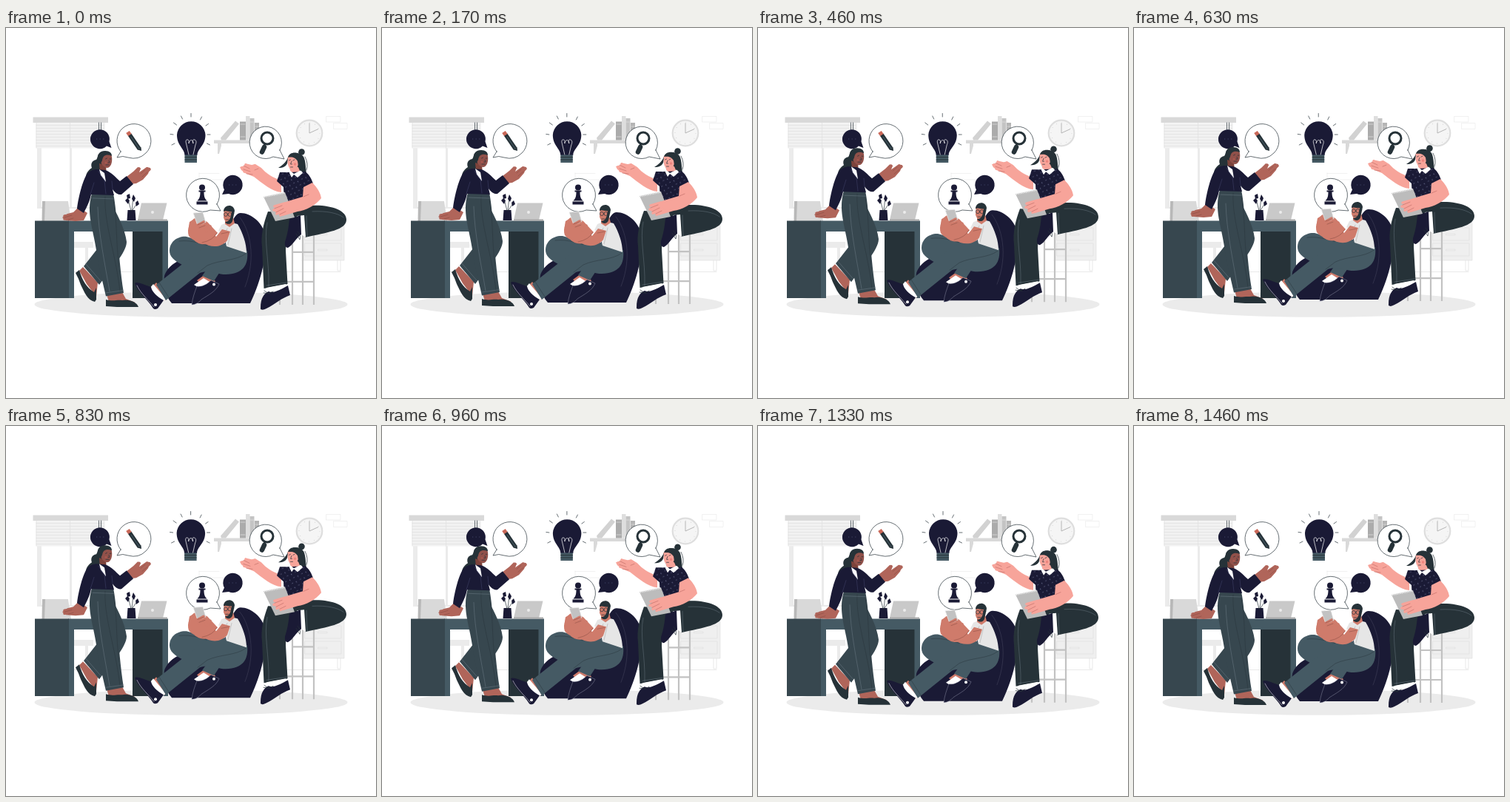
Write an HTML page that moves like this. It is 500 by 500 pixels and loops after 1.5 s.

```html
<!DOCTYPE html>
<html lang="en">
<head>
<meta charset="utf-8">
<title>Team brainstorming</title>
<style>
  html, body { margin: 0; width: 100%; height: 100%; overflow: hidden; background: #fff; }
  svg { display: block; width: 100vw; height: 100vh; }
  .navy { fill: #1a1a35; } .dark { fill: #263238; } .slate { fill: #37474f; } .steel { fill: #455a64; }
  .brown { fill: #b0655a; } .tan { fill: #cf7b6b; } .pink { fill: #f7a49a; } .white { fill: #fff; }
  .pale { fill: #ebebeb; } .gray { fill: #d9d9d9; }
  .line { fill: none; stroke: #263238; stroke-width: .7; stroke-linecap: round; stroke-linejoin: round; }
  .light { stroke: #e0e0e0; } .thin { stroke-width: .45; } .seam { stroke: #8795a0; stroke-width: .35; }
  .crease { stroke: #7c443b; stroke-width: .45; } .edge { stroke: #a9adc0; stroke-width: .4; }
  .finger { fill: none; stroke-width: 3.6; stroke-linecap: round; stroke-linejoin: round; }
</style>
</head>
<body>
<svg viewBox="0 0 500 500">
  <defs>
    <pattern id="dots" width="9" height="8" patternUnits="userSpaceOnUse" patternTransform="rotate(15)">
      <rect width="9" height="8" fill="#1a1a35"/>
      <path d="M2 2l1.400 .8M6.500 6l1.200-.8" stroke="#8d91b5" stroke-width=".8"/>
    </pattern>
  </defs>

  <g id="room">
    <path class="pale" d="M42 162h6v80h38v-80h3v80h43v-34h2v36H42z"/>
    <path d="M86.500 128.500v34" stroke="#f1f1f1" stroke-width="92"/>
    <path d="M86.500 131v31" stroke="#e2e2e2" stroke-width="92" stroke-dasharray=".7 3.300"/>
    <path class="line light" d="M86.500 128v34M41 128v34M133 128v34"/>
    <path class="gray" d="M36.500 120.500H138v7.500H36.500z"/>
    <path class="line" d="M125.500 128v10M128.500 128v10"/>

    <path class="gray" d="M281 151.500h62v4.500h-52v3l-3 11h-2v-14h-5z"/>
    <path d="M290 148.500l20-23 5 4-18 22h-6z" fill="#d2d2d2"/>
    <path d="M316 126.500h8v25h-8z" fill="#ababab"/>
    <path d="M324 119h5.500v32.500H324z" fill="#dedede"/>
    <path d="M329.500 122h6v29.500h-6z" fill="#c4c4c4"/>
    <path d="M336 128h6v23.500h-6z" fill="#b5b5b5"/>
    <path class="line light" d="M317 130h6M317 147h6M325 124h4M330 127h5M337 133h4"/>

    <circle cx="410" cy="142" r="17.300" fill="#f5f5f5" stroke="#dedede" stroke-width="2.200"/>
    <circle cx="410" cy="142" r="14" fill="none" stroke="#ccc" stroke-width="1.200" stroke-dasharray=".6 6.730"/>
    <path d="M410 128.500V142l12-5.500" fill="none" stroke="#b5b5b5"/>
    <path class="line light thin" d="M433 119.500h19v7.500h-19zM443 128.500h18v8h-18zM261 196.500h27M261 196v9M276 205h17"/>

    <path class="line light" d="M92 329.500h360"/>
    <path d="M400 262h57v52h-57z" fill="#efefef"/>
    <path class="line light" d="M457 264v50h-57M404 270h49v17h-49zM404 291h49v17h-49zM422 278h12v2h-12zM422 299h12v2h-12zM448 314v14h4v-14"/>
    <path class="pale" d="M92 289h26v8H92zM107 297h4v33h-4z"/>
  </g>

  <ellipse class="pale" cx="250" cy="373.500" rx="211.500" ry="17.300"/>

  <g id="desk">
    <path class="gray" d="M51 234h33l4 27H49z"/>
    <path d="M49 234h4l-1 27h-3.500z" fill="#b8b8b8"/>
    <path class="dark" d="M171 275h42v90h-42z"/>
    <path class="steel" d="M84 260.500h135V365h-7.500v-90H92v90h-8z"/>
    <path class="slate" d="M39 260.500h46V365H39z"/>
    <path d="M183 236.500h34.500l-5.500 23h-34z" fill="#c9c9c9"/>
    <path d="M178 258.500h40v2h-40z" fill="#aaa"/>
    <circle class="pale" cx="198" cy="249" r="2"/>
    <path class="navy" d="M164.500 246h10l1 14h-12z"/>
    <path class="line" d="M169 247l-4-16M170 247l2-19M171 246l6-9"/>
    <path class="navy" d="M161 233l3-3 3 3-2 5zM163 226l4-2 1 6-4 1zM170 231l2-6 3 5-2 5zM175 236l3-3 2 5-4 3z"/>
  </g>

  <g id="bulb">
    <path class="line" d="M250 115.500v4.500M236.500 119l2 4M264.500 120l-2 4M226.500 128l4 3M273.500 129.500l-3.500 2.500M222 143.500l4 .5M276 144h-4M224 158l4-2M275.500 158l-4-2"/>
    <path class="navy" d="M241.500 172c0-9-10.500-13-10.500-27.500a19.300 19.600 0 0 1 38.500 0c0 14.500-11 18.500-11 27.500z"/>
    <path class="steel" d="M241.500 171.500h16.500v10.500h-16.500z"/>
    <path d="M241.500 174.500h16.500M241.500 178h16.500" stroke="#263238" stroke-width="1"/>
    <path class="line" style="stroke:#fff" d="M247 171l-4-17q0-4 3-3 2 1 1 5c1-6 6-6 6 0-2-4 0-6 2-5 3 1 2 5 1 7l-3 13"/>
  </g>

  <g id="bubbles">
    <g class="line" style="fill:#fff">
      <path d="M155 167l-5 8q8-3 15 0 14 4 24-6a23 23 0 1 0-34-2z"/>
      <path d="M370 165l6 12-15-3a21.700 21.700 0 1 1 9-9z"/>
      <path d="M285 238l5 9-14-1a22.500 22.500 0 1 1 9-8z"/>
    </g>
    <path d="M167 144l13 19" stroke="#263238" stroke-width="5.500"/>
    <path d="M169 147l11 16" stroke="#607d8b" stroke-width=".6"/>
    <path d="M164.500 140.500l2.800 4" stroke="#c96858" stroke-width="5.500"/>
    <path class="dark" d="M177.500 164.500l5-3.500 .5 5z"/>

    <circle cx="353" cy="149" r="8" fill="#fff" stroke="#263238" stroke-width="3"/>
    <path d="M350 157l-1.500 4" stroke="#263238" stroke-width="3"/>
    <path d="M349 161l-3 6.500" stroke="#263238" stroke-width="6.500" stroke-linecap="round"/>

    <circle class="navy" cx="265" cy="215.500" r="4"/>
    <path class="navy" d="M260.500 219.500h9v2h-2c0 6 1 9 4 12h-13c3-3 4-6 4-12h-2zM257.500 234.500h15v4h-15z"/>

    <path class="navy" d="M136 159.500a13 13 0 1 1 3.500-6l3 8.500zM295 218.500a13.200 13.200 0 1 1 6 5.500l-9 1z"/>
    <path d="M122 150h11M301 212h11" stroke="#3d4264" stroke-width="1.200" stroke-dasharray="1.200 3.400"/>
  </g>

  <g id="team">
    <g id="presenter">
      <path class="brown" d="M104 323l20 21-2 19-13-17-10-18z"/>
      <path class="dark" d="M94 331l5-4c4 14 10 24 20 30l3-6v16l-2 3c-10-2-14-13-19-23q-3-9-7-16z"/>
      <path class="slate" d="M135 228C150 248 161 272 163 289C163 303 142 326 126 347L105 322L130 290z"/>
      <path class="brown" d="M136 360l21-3 5 9 13 5-36-1z"/>
      <path class="dark" d="M135 367c10 3 14 0 22 1 8-2 20 2 22 9h-29l-15-1z"/>
      <path class="slate" d="M116 224H145C151 252 150 300 159 358L135 362.500C130 340 124 318 122 300C118 272 108 250 116 224z"/>
      <path class="line thin" d="M134 228c-2 35 15 80 20 128M145 232C151 265 148 290 153 323"/>
      <path class="line seam" d="M117 230l28 1M124 242c1 37 10 78 16 114M135 358l24-3.500M108 319l20 23"/>

      <path class="dark" d="M128 168c-5 3-4 8-6 10-6 1-8 6-6 11-5 3-9 9-8 14 1 4 3 6 6 6 0-7 3-12 6-16 7 1 10-3 11-10z"/>
      <path d="M126 183l9 3 1 13-9-4z" fill="#7d433b"/>
      <path d="M127 172c3-4 15-4 16 2 1 7-1 15-7 15-6-1-10-9-9-17z" fill="#91514a"/>
      <path class="dark" d="M125 179c-3-7 1-13 9-13 6 0 9 3 9 7-7-3-12-1-13 6l-2 4z"/>
      <path class="line" d="M134.500 177l2-1M140 177h2M139 179l1 3h-2M135 185h4"/>
      <circle cx="135" cy="182" r="1.500" fill="#a9574e"/>

      <g class="brown">
        <path d="M98 242l-7 7-8 2-7 5 5 4 13 1 11-1 5-10z"/>
        <path d="M163 201l9-7 6-6 4 2-2 5 10-7 5 1-3 8-7 8-9 5-8 1z"/>
      </g>
      <path class="finger" stroke="#b0655a" d="M93 252l-14 2M93 256l-14 2M176 197l4-7M181 199l10-9M182 202l12-11"/>
      <path class="line crease" d="M89 253l-10 3M91 257l-7 2M182 197l6-5M184 201l7-6"/>
      <path class="navy" d="M123 191l11 1c9 3 14 10 20 15l9-7 9 11-16 14c-5 1-9-3-12-7l2 8-31-1c-2 10-6 17-10 25l-9-6c2-16 8-40 14-47 3-4 8-6 13-6z"/>
      <path class="white" d="M126 191l7 5 2 12-7-9z"/>
      <path class="line" style="stroke:#4e527d;stroke-width:.4" d="M133 206l2 18M114 225l5-16M143 207l1 11M125 194l9 13"/>
    </g>

    <g id="reader">
      <path class="navy" d="M214 335c5-14 20-27 52-24l30-20c5-18 11-41 21-41 14 0 30 13 33 29 4 33-9 71-20 93H224c-9-10-12-24-10-37z"/>
      <path class="line edge" d="M316 256c13 16 23 53 7 94" opacity=".4"/>
      <path class="tan" d="M258 341l11-8 14 9-11 12z"/>
      <path class="white" d="M254 347l13-9 13 8-11 10z"/>
      <path class="navy edge" d="M251 374c1-9 4-17 7-25 6 1 13-2 19-8l11 5c-4 10-15 15-24 21q-6 7-13 7z"/>
      <circle class="white" cx="281" cy="346.500" r="2"/>
      <path class="steel" d="M221 301c0-12 11-20 23-19l60 17-10 22-44 5-12-6c-11-6-17-11-17-19z"/>
      <path class="steel" d="M277 318l17 4-13 20-16-7z"/>
      <path class="line thin" d="M234 288c18-2 30 4 46 8"/>

      <path class="tan" d="M203 344l17 20-9 6-16-18z"/>
      <path class="white" d="M199 346l17 20-6 6-16-20z"/>
      <path class="navy" d="M174 345c3-3 12 2 22 5 1 6 8 13 17 18l-8 11q-4 2-6 0c-8-13-21-22-25-34z"/>
      <circle class="white" cx="202" cy="374" r="2"/>
      <path class="line" style="stroke:#fff;stroke-width:.5" d="M177 348c5 11 16 20 23 29"/>
      <path class="steel" d="M203 347l58-46c9-8 22-12 34-10l31 10c2 20-6 31-29 32-13 0-22-7-35-2l-46 37z"/>
      <path class="line thin" d="M324 305c-13 10-35 8-52 16l-13 10M207 344l13 20"/>

      <path d="M291 266l10-4 12 3c7 12 12 26 12 39l-27-9-4-15-7-6z" fill="#e6e6e6"/>
      <path class="line thin" style="stroke:#999" d="M299 271l-4 9M300 293l5-22"/>
      <path class="tan" d="M296 257l11-1 2 8-7 5-6-4z"/>
      <path class="tan" d="M257 256c-9 4-13 16-10 25 5 6 10 7 18 8 12 9 26 8 34-2l4-12-11-3-8 10-8-10-10-8z"/>
      <path class="tan" d="M248 262l10-6 14 6 14 15-14 15c-17 3-28-13-24-30z"/>
      <path class="line crease" d="M265 290q15-3 20-13M301 276l-10 2"/>
      <path d="M253 250l13-1 4 14-11 4z" fill="#c2c2c2" stroke="#eee" stroke-width=".7"/>
      <path class="finger" stroke="#cf7b6b" d="M258 267l9-5M260 271l9-4M271 275l-2-10M273 273l3-5"/>
      <path class="line crease" d="M259 266l8-3M261 270l8-3"/>
      <path class="tan" d="M294.500 246c2-5 12-4 13.500 0l-1 10c-3 9-11 9-13 0z"/>
      <path class="dark" d="M294 248c0-10 14-11 15-1l-3 14c-2 5-8 5-10 1 5 0 8-4 9-14-4 1-7-2-11 0z"/>
      <g class="line">
        <circle cx="297" cy="252" r="2.500"/><circle cx="302.500" cy="252" r="2.500"/>
        <path d="M305 252l3-1M297 259h4"/>
      </g>
    </g>

    <g id="writer">
      <path d="M370 345v29M387 270v104M401 270v104M416 270v104M386 303h31M370 343h47" fill="none" stroke="#c2c2c2" stroke-width="2.200"/>
      <path class="gray" d="M378 270h47v8h-47z"/>

      <path class="dark" d="M354 248L392 250C382 270 378 285 378 301L380.500 346L348.500 352L346 296C344 280 348 264 354 248z"/>
      <path class="white" d="M352 351l26-5 1 6-23 8z"/>
      <path class="navy" d="M344 378c0-13 5-20 11-22 6 3 15-2 26-8l3 13c-12 4-20 12-32 18q-5 3-8 1z"/>
      <path class="line" d="M348 358l9 1M349 355l6 4 6-3"/>
      <path class="dark" d="M381 241L414 240C440 239 460 247 460 259C460 273 435 276 404 283L402 254L381 258z"/>
      <path class="white" d="M393 254l10-1 2 30-6-4z"/>
      <path class="navy" d="M383 258l15-5 1 26c-7 5-12 15-18 18q-5 0-4-8c4-12 5-21 6-31z"/>
      <path class="line" d="M394 275q5 6 3 11l-5-8"/>
      <path class="line seam" d="M414 248c19-1 34 2 42 8M406 254l1 28M353 263c-5 24 3 52 2 86M352 348l27-4"/>

      <path class="dark" d="M382 174C386 167 400 167 403 176C406 185 404 193 408 203L398 208L384 192z"/>
      <circle class="dark" cx="399.500" cy="167.500" r="4.300"/>
      <path class="line" d="M404 174q5 9 2 18M395 169l4-4"/>
      <path class="pink" d="M384 186l11 2 4 10-7 5-8-6z"/>
      <path class="pink" d="M372 206c-12-4-20-9-27-17l-8-5-5 1-9-2-1 3-6 2 2 4 7 5 10 4c12 9 24 20 37 21z"/>
      <path class="finger" stroke="#f7a49a" d="M332 190l-8-5M331 193l-12-4M332 196l-10-2M342 191l-6-5"/>
      <path class="line" style="stroke:#a95551;stroke-width:.45" d="M329 190l-8-4M330 194l-9-3M333 198l-8-1M341 190l-5 2"/>
      <path fill="url(#dots)" d="M382 195l22-1c5 3 8 8 11 16l-12 6-1 20-26 1-1-22-9-8 4-12z"/>
      <path class="white" d="M383 192l6 5 10-5 2 4-7 6-5-4-3 4-3-6z"/>
      <path class="pink" d="M380.500 175c3-5 14-4 15 4 0 9-4 13-8 13-5 0-8-8-7-17z"/>
      <path class="dark" d="M381 175c2-9 17-8 19 0v19c-5-3-5-9-6-14-3-5-7-6-13-5zM381 175c-3 7-8 11-13 14 7 0 10-2 12-6z"/>
      <path class="line" d="M382.500 179l2-1M388 179l2-1M386 180l-1.500 4h2M384.500 188h3"/>
      <circle cx="390.500" cy="184" r="1.800" fill="#ee857e"/>

      <path d="M348 228l29-6 13 34-26 5z" fill="#bcbcbc"/>
      <path d="M349 228l28-5.500" stroke="#f7f7f7" stroke-width="2.500" stroke-dasharray="1 1.200"/>
      <path class="pink" d="M402 215l12-6c7 7 11 14 12 21-7 9-21 17-32 18l-20 6-11-6 3-8 15-6 20-6z"/>
      <path class="finger" stroke="#f7a49a" d="M377 237l-14 4M377 240l-15 6M379 245l-13 6M382 248l-11 5"/>
      <path class="line" style="stroke:#a95551;stroke-width:.45" d="M373 240l-10 4M375 244l-10 5M378 248l-8 4M402 228l7-3"/>
    </g>
  </g>
</svg>
<script>
  const LOOP = 1500, LIFT = 5, LEAD = 45;
  const SWAY_TIME = 1100, SWAY = 0.8;
  const team = document.getElementById('team');
  const bulb = document.getElementById('bulb');
  const wave = (t, period) => (1 - Math.cos(2 * Math.PI * t / period)) / 2;

  function draw() {
    const t = performance.now() % LOOP;
    const sway = wave(Math.min(t, SWAY_TIME), SWAY_TIME);
    team.setAttribute('transform', `translate(0 ${-LIFT * wave(t + LEAD, LOOP)})`);
    bulb.setAttribute('transform', `translate(${-SWAY * sway} 0)`);
    requestAnimationFrame(draw);
  }
  draw();
</script>
</body>
</html>
```
